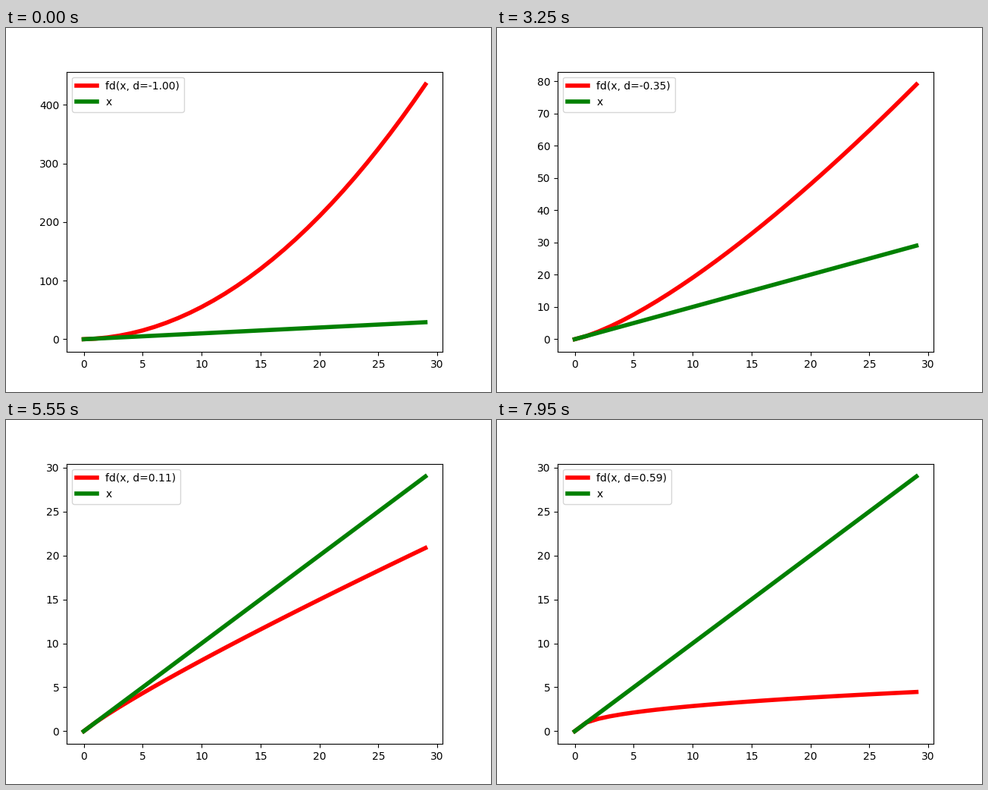
Animation of 640x480 px, one loop 8000 ms. Source, as a matplotlib script:

```python
import numpy as np
import matplotlib.pyplot as plt
from matplotlib.animation import FuncAnimation

FRAMES = 160
INTERVAL = 50
STEP = 0.01

x = np.arange(30)


def frac_diff(values, d):
    """Fractional difference of order d (d=-1 sums, d=0 is the identity)."""
    weights = [1.0]
    for k in range(1, len(values)):
        weights.append(-weights[-1] * (d - k + 1) / k)
    return np.convolve(weights, values)[:len(values)]


def order(frame):
    return round(-1 + STEP * frame, 2)


def label(d):
    return f"fd(x, d={d:.2f})"


fig, ax = plt.subplots(figsize=(6.4, 4.8), dpi=100)
curve, = ax.plot(x, frac_diff(x, -1), color="red", lw=4, label=label(-1))
ax.plot(x, x, color="green", lw=4, label="x")
legend = ax.legend(loc="upper left")


def update(frame):
    d = order(frame)
    curve.set_ydata(frac_diff(x, d))
    legend.get_texts()[0].set_text(label(d))
    ax.relim()
    ax.autoscale_view()
    return curve, legend


anim = FuncAnimation(fig, update, frames=FRAMES, interval=INTERVAL,
                     repeat=True, repeat_delay=0, blit=False)
plt.show()
```
